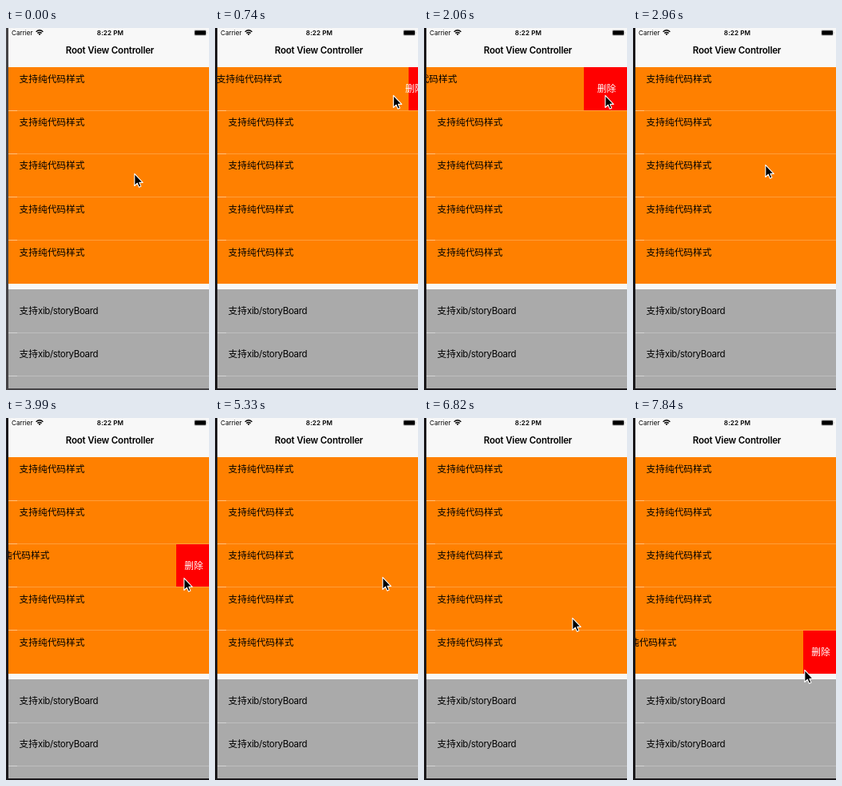
Animation of 254x453 px, one loop 8000 ms. Source, as an HTML page:

```html
<!DOCTYPE html>
<html lang="zh-CN">
<head>
<meta charset="utf-8">
<title>Swipe to delete</title>
<style>
  html, body { margin: 0; width: 100%; height: 100%; overflow: hidden; background: #f8f8f8; }
  svg { display: block; width: 254px; height: 453px; }
  text { font: 11.7px Inter, "Noto Sans CJK SC", "Noto Sans CJK", sans-serif; }
  .label { font-family: "Noto Sans CJK SC", "Noto Sans CJK", sans-serif; }
  .latin { font-family: Inter, sans-serif; font-size: 11.5px; letter-spacing: -.35px; }
  .title { font-size: 11.5px; font-weight: 600; letter-spacing: -.18px; text-anchor: middle; }
  .status { font-size: 8.1px; }
  .clock { font-weight: 600; letter-spacing: .1px; text-anchor: middle; }
  .action { fill: #fff; text-anchor: middle; }
</style>
</head>
<body>
<svg viewBox="0 0 254 453">
  <rect width="254" height="453" fill="#f8f8f8"/>
  <text class="status" x="7" y="9">Carrier</text>
  <g fill="none" stroke="#000" stroke-width="1.4">
    <path d="M37.6 4.8Q42 .8 46.4 4.8M39.3 6.6Q42 4.2 44.7 6.6"/>
    <path d="M40.5 7.6Q42 6.5 43.5 7.6L42 9.2Z" fill="#000" stroke="none"/>
  </g>
  <text class="status clock" x="130.5" y="9">8:22 PM</text>
  <rect x="235.5" y="2.5" width="15" height="7" rx="1.5" fill="none" stroke="#bbb" stroke-width=".7"/>
  <rect x="236.2" y="3.2" width="13.8" height="5.6" rx=".8"/>
  <path d="M251.6 4.8q1.2 1.2 0 2.4z" fill="#999"/>
  <text class="title" x="130" y="31.5">Root View Controller</text>
  <g id="list"></g>
  <path id="frame" d="M0 0H3V451H254V453H0Z"/>
  <path id="cursor" d="M.8 1.3V16.5L4.3 13.2L6.5 18.2L8.9 17.1L6.8 12.4H11.2Z"
        fill="#000" stroke="#fff" stroke-width="1.1" stroke-linejoin="round"/>
</svg>
<script>
const LOOP = 8000, STEP = 148, LEAD = 7;
const ROW = 54.2, TOP = 49, GRAY_TOP = 327, EDGE = 257;
const DRAWER = 44, CONFIRM = 26;      // first width, extra width after the tap
const DRAG_FROM = 238, DRAG_TO = 178, DRAG_STEPS = 3;
const list = document.getElementById("list");
const frame = document.getElementById("frame");
const cursor = document.getElementById("cursor");

// open, tap and close are steps; stops are pointer places after the drag: step, x, y
const swipes = [
  { row: 0, open: 4, tap: 11, close: 17, stops: [[9, 210, 83], [10, 226, 83], [18, 226, 83], [20, 165, 170]] },
  { row: 2, open: 22, tap: 27, close: 36, stops: [[27, 222, 199], [32, 209, 198], [37, 209, 198]] },
  { row: 3, open: 39, tap: 42, close: 46, stops: [[43, 215, 249], [46, 185, 249]] },
  { row: 4, open: 48, tap: 55, close: 55, stops: [[53, 214, 314]] }
];

const pointer = [[1, 160, 181], ...swipes.flatMap(({ open, stops }) => [
  [open, DRAG_FROM, stops[0][2]],
  [open + DRAG_STEPS, DRAG_TO, stops[0][2]],
  ...stops
])];

const ramp = (n, start, length) => Math.min(1, Math.max(0, (n - start) / length));

function drawerWidth(row, n) {
  const s = swipes.find(s => s.row === row && n > s.open && n < s.close);
  return s ? DRAWER * ramp(n, s.open, DRAG_STEPS) + CONFIRM * ramp(n, s.tap, 4) : 0;
}

function pointerAt(n) {
  const i = pointer.findIndex(p => p[0] > n);
  if (i < 1) return pointer.at(i).slice(1);
  const [from, x, y] = pointer[i - 1], [to, x2, y2] = pointer[i];
  const p = ramp(n, from, to - from), e = p * p * (3 - 2 * p);
  return [x + (x2 - x) * e, y + (y2 - y) * e];
}

function add(tag, attrs, content = "") {
  const el = document.createElementNS("http://www.w3.org/2000/svg", tag);
  for (const key in attrs) el.setAttribute(key, attrs[key]);
  el.textContent = content;
  list.append(el);
  return el;
}

function separator(y) {
  add("rect", { x: 3, y, width: 11, height: 1, fill: "#fff", opacity: .5 });
  add("rect", { x: 14, y, width: 240, height: 1, fill: "#fff", opacity: .23 });
}

function orangeRow(i) {
  const y = TOP + ROW * i, top = Math.ceil(y), bottom = Math.floor(y + ROW + .01);
  const label = add("text", { class: "label", y: Math.round(y + 19) }, "支持纯代码样式");
  if (i < 4) separator(bottom);
  const button = add("rect", { y: top, height: bottom - top, fill: "#f00" });
  const action = add("text", { class: "label action", y: Math.round(y + 31.4) }, "删除");
  return width => {
    label.setAttribute("x", 16.6 - width);
    button.setAttribute("x", EDGE - width);
    button.setAttribute("width", width);
    action.setAttribute("x", EDGE - width / 2);
    action.setAttribute("visibility", width ? "visible" : "hidden");
  };
}

function grayRow(i) {
  const y = GRAY_TOP + ROW * i, base = Math.round(y + 30.7);
  add("text", { class: "label", x: 16.6, y: base }, "支持");
  add("text", { class: "latin", x: 40, y: base }, "xib/storyBoard");
  separator(Math.floor(y + ROW));
}

add("rect", { x: 3, y: TOP, width: 251, height: 271, fill: "#ff8000" });
add("rect", { x: 3, y: GRAY_TOP, width: 251, height: 126, fill: "#aaa" });
const rows = [0, 1, 2, 3, 4].map(orangeRow);
[0, 1].forEach(grayRow);

function draw(time) {
  const n = Math.floor((time % LOOP + LEAD) / STEP);
  rows.forEach((setWidth, i) => setWidth(drawerWidth(i, n)));
  cursor.setAttribute("transform", `translate(${pointerAt(n)})`);
  frame.setAttribute("fill", n < 2 ? "#454346" : "#1a181b");
}

const start = performance.now();
function tick() {
  draw(performance.now() - start);
  requestAnimationFrame(tick);
}
tick();
</script>
</body>
</html>
```
